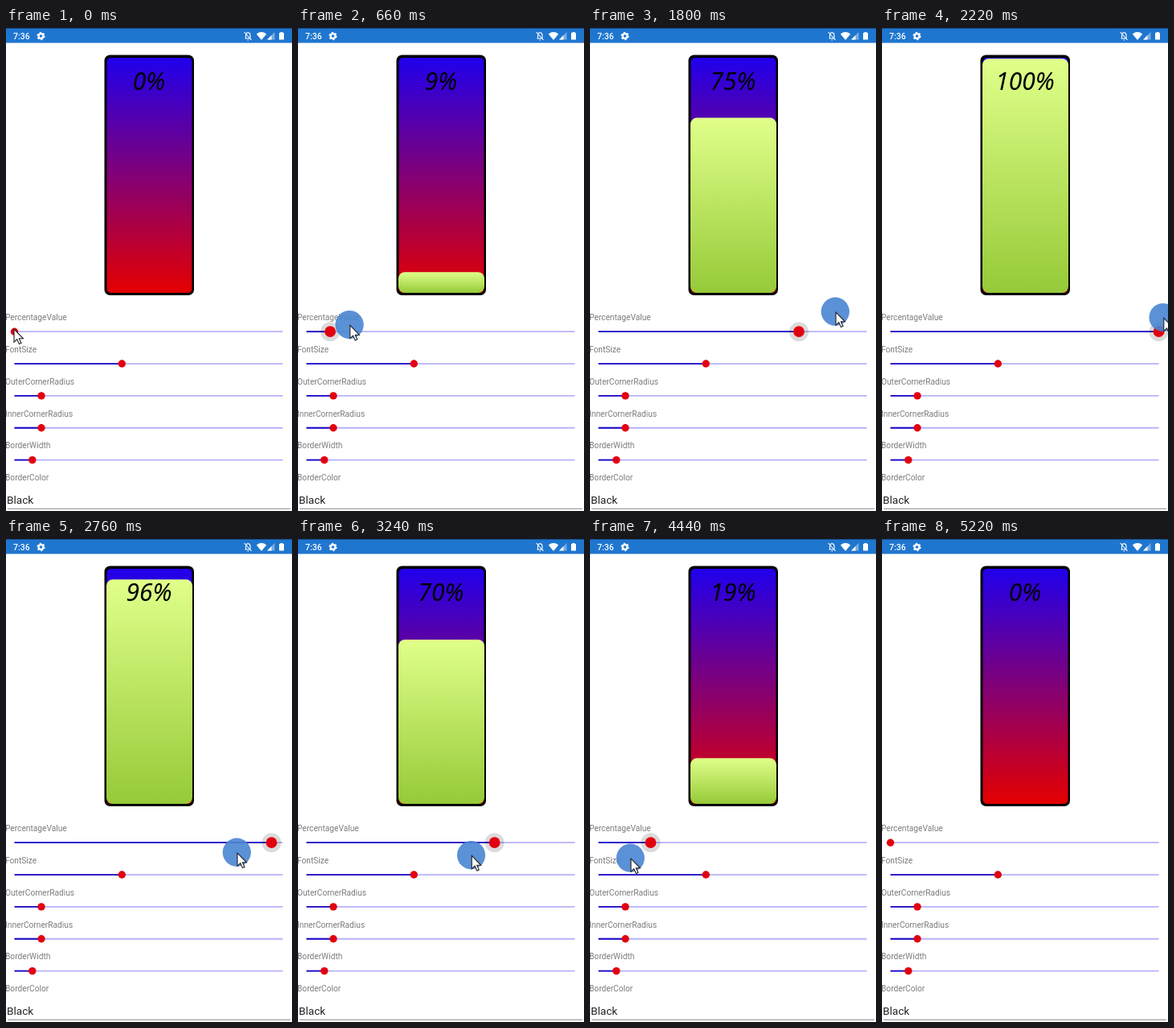
Animation, 356 px wide and 600 px high, one loop 5280 ms. Source, as an HTML page:

```html
<!DOCTYPE html>
<html lang="en">
<head>
<meta charset="utf-8">
<title>Percentage gauge</title>
<style>
  html, body { margin: 0; width: 100%; height: 100%; overflow: hidden; background: #fff; }
  svg { display: block; width: 356px; height: 600px; }
  text { font-family: Roboto, sans-serif; }
  .label { font-size: 10.2px; fill: #7c7c7c; }
  .clock { font-size: 10.5px; font-weight: 500; fill: #fff; }
  .entry { font-size: 13.6px; fill: #222; }
  .percent { font: italic 30px "Noto Sans", sans-serif; text-anchor: middle; }
  .rail { stroke: #b6b2fa; stroke-width: 1.8; }
  .active { stroke: #1a08c4; stroke-width: 1.8; }
  .thumb { fill: #e2000f; }
</style>
</head>
<body>
<svg viewBox="0 0 356 600">
  <defs>
    <linearGradient id="back" x1="0" y1="0" x2="0" y2="1">
      <stop stop-color="#2000ec"/><stop offset="1" stop-color="#e40000"/>
    </linearGradient>
    <linearGradient id="lime" x1="0" y1="0" x2="0" y2="1">
      <stop stop-color="#e0ff8a"/><stop offset="1" stop-color="#96ca38"/>
    </linearGradient>
  </defs>

  <rect width="356" height="18.5" fill="#1f76cf"/>
  <rect width="356" height="1" fill="#174f88"/>
  <text class="clock" x="9" y="13.8">7:36</text>
  <g fill="none" stroke="#fff">
    <circle cx="43.5" cy="10" r="2.9" stroke-width="2.2"/>
    <circle cx="43.5" cy="10" r="4.4" stroke-width="1.5" stroke-dasharray="2.3 2.308"/>
    <path d="M297.5 13h7.5M298.5 12.5V9q0-3 2.8-3.2Q304 6 304 9v3M300.5 15h1.5M296.5 5l9 10" stroke-width="1.1"/>
  </g>
  <path d="M311.8 7.4q6.2-4.6 12.4 0L318 15z" fill="#fff"/>
  <path d="M334.5 5v9.5H325z" fill="#fff" opacity=".4"/>
  <path d="M330.5 9v5.5H325z" fill="#fff"/>
  <path d="M340 6h1.5V5h3v1h1.5v8.5h-6z" fill="#fff"/>

  <rect x="122.5" y="33.5" width="111.5" height="298.5" rx="7"/>
  <rect x="125.5" y="37" width="106" height="292" rx="5" fill="url(#back)"/>
  <rect id="fill" x="125" width="107" rx="8" fill="url(#lime)"/>
  <text id="percent" class="percent" x="178" y="77"></text>

  <g id="sliders"></g>
  <text class="label" x="-1" y="562.3">BorderColor</text>
  <text class="entry" x="1" y="591">Black</text>
  <path d="M2 597.2H354" stroke="#858585"/>

  <circle id="touch" r="17.6" fill="#4a86d2" opacity=".9"/>
  <path id="cursor" d="M0 0V16.2L3.8 12.7L6.4 18.6L9 17.4L6.4 11.8H11.5Z" fill="#fff" stroke="#222" stroke-width="1.1"/>
</svg>
<script>
const LOOP = 5280, STEP = 60, LAG = 190;
const LEFT = 10.5, SPAN = 334, BOTTOM = 329, HEIGHT = 291;
const $ = id => document.getElementById(id);

// Pointer path: time, x, y
const path = [
  [0, 10, 374], [180, 10, 374], [400, 31, 372], [700, 70, 369], [1010, 128, 367],
  [1200, 159, 366], [1610, 260, 357], [1800, 306, 353], [1960, 342, 352],
  [2140, 352, 356], [2400, 348, 370], [2570, 330.5, 381], [2760, 288, 390],
  [3590, 164, 396], [3780, 134, 397], [4250, 75.5, 398], [4440, 51, 397], [4960, -25, 397]
];

function pointer(t) {
  const i = path.findIndex(p => p[0] > t);
  if (i < 0) return path[path.length - 1].slice(1);
  if (i === 0) return path[0].slice(1);
  const [t0, x0, y0] = path[i - 1], [t1, x1, y1] = path[i];
  const k = (t - t0) / (t1 - t0);
  return [x0 + (x1 - x0) * k, y0 + (y1 - y0) * k];
}

const sliders = [
  ["PercentageValue", LEFT], ["FontSize", 144.3], ["OuterCornerRadius", 44],
  ["InnerCornerRadius", 44], ["BorderWidth", 32.8]
];
$("sliders").innerHTML = sliders.map(([name, x], i) => {
  const y = 377.2 + i * 39.85;
  return `<text class="label" x="-1" y="${y - 14.2}">${name}</text>
    <path class="rail" d="M${LEFT} ${y}H${LEFT + SPAN}"/>
    <path class="active" d="M${LEFT} ${y}H${x}"/>
    <circle class="halo" cx="${x}" cy="${y}" r="12" opacity="0"/>
    <circle class="thumb" cx="${x}" cy="${y}" r="4.7"/>`;
}).join("");
const [active, halo, thumb] = ["active", "halo", "thumb"].map(c => document.querySelector("." + c));

function draw(t) {
  const [x, y] = pointer(t);
  const tx = Math.min(LEFT + SPAN, Math.max(LEFT, pointer(t - LAG)[0]));
  const value = (tx - LEFT) / SPAN;
  const pressed = t >= 180 && t < 5100;

  $("fill").setAttribute("y", BOTTOM - HEIGHT * value);
  $("fill").setAttribute("height", HEIGHT * value);
  $("percent").textContent = Math.round(value * 100) + "%";

  active.setAttribute("d", `M${LEFT} 377.2H${tx}`);
  halo.setAttribute("cx", tx);
  halo.setAttribute("opacity", pressed ? 0.14 : 0);
  thumb.setAttribute("cx", tx);
  thumb.setAttribute("r", pressed ? 6.9 : 4.7);

  $("touch").setAttribute("transform", `translate(${x - 0.7} ${y - 0.8})`);
  $("touch").setAttribute("visibility", t >= 120 ? "visible" : "hidden");
  $("cursor").setAttribute("transform", `translate(${x} ${y})`);
}

const start = performance.now();
function tick() {
  const t = (performance.now() - start) % LOOP;
  draw(Math.floor(t / STEP) * STEP);
  requestAnimationFrame(tick);
}
tick();
</script>
</body>
</html>
```
